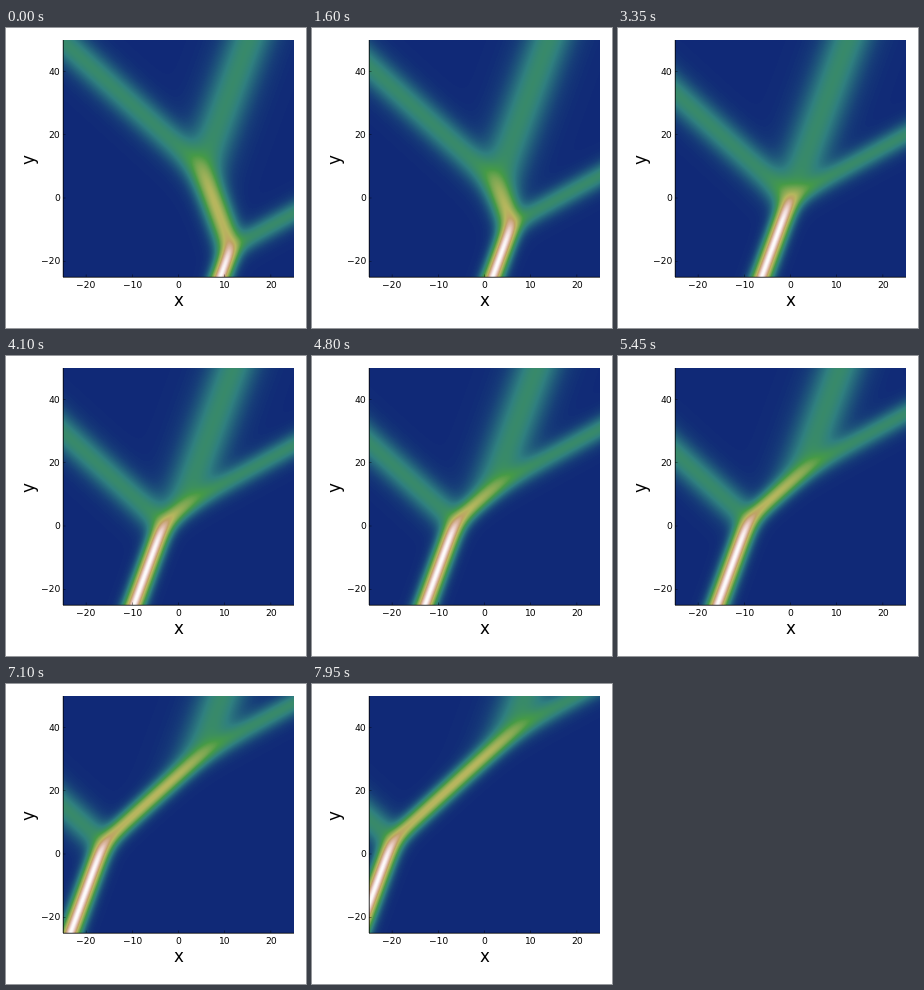
Animation of 300 by 300 pixels, one loop 8 s. Source, as a matplotlib script:

```python
import numpy as np
import matplotlib.pyplot as plt
from matplotlib.animation import FuncAnimation

SIZE, DPI = 300, 100
FRAMES, INTERVAL = 160, 50
LEFT, RIGHT, TOP, BOTTOM = 57, 288, 12, 249
XMIN, XMAX, YMIN, YMAX = -25, 25, -25, 50
K = np.array([-0.625, -0.125, 0.375, 0.875])   # wave numbers
T_MEET, DT = 67, 0.375                         # frame where all waves meet
PEAK = (K[-1] - K[0]) ** 2 / 2
GAIN = 7                                       # strength of the log scale
VMAX = np.log1p(GAIN)


def px(x):
    return LEFT + (x - XMIN) / (XMAX - XMIN) * (RIGHT - LEFT)


def py(y):
    return BOTTOM - (y - YMIN) / (YMAX - YMIN) * (BOTTOM - TOP)


def points(pixels):
    return pixels * 72 / DPI


COLS, ROWS = RIGHT - LEFT, BOTTOM - TOP
xs = XMIN + (np.arange(COLS) + 0.5) * (XMAX - XMIN) / COLS
ys = YMAX - (np.arange(ROWS) + 0.5) * (YMAX - YMIN) / ROWS
X, Y = np.meshgrid(xs, ys)
BASE = [k * X - k**2 * Y for k in K]


def wave(frame):
    """Log-scaled 2 (log tau)_xx, where tau is a sum of four exponentials."""
    t = (frame - T_MEET) * DT
    phase = np.array([b + k**3 * t for b, k in zip(BASE, K)])
    w = np.exp(phase - phase.max(axis=0))
    w /= w.sum(axis=0)
    mean = np.tensordot(K, w, 1)
    var = sum(wi * (k - mean) ** 2 for wi, k in zip(w, K))
    return np.log1p(GAIN * 2 * var / PEAK)


plt.rcParams["font.family"] = "DejaVu Sans"
fig = plt.figure(figsize=(SIZE / DPI, SIZE / DPI), dpi=DPI, facecolor="white")
ax = fig.add_axes([0, 0, 1, 1])
image = ax.imshow(wave(0), cmap="gist_earth", vmin=-VMAX / 9, vmax=VMAX,
                  extent=[LEFT, RIGHT, BOTTOM, TOP], aspect="auto",
                  interpolation="nearest")
ax.set_xlim(0, SIZE)
ax.set_ylim(SIZE, 0)
ax.axis("off")


def line(x, y, width):
    ax.plot(x, y, color="black", lw=points(width), solid_capstyle="butt",
            snap=False)


def label(x, y, text, size, **kw):
    ax.text(x, y, text, fontsize=points(size), va="baseline",
            rotation_mode="anchor", **kw)


line([LEFT, RIGHT], [BOTTOM + 0.2] * 2, 0.8)
line([LEFT + 0.2] * 2, [TOP, BOTTOM], 0.8)

for v in (-20, -10, 0, 10, 20):
    line([px(v)] * 2, [BOTTOM, BOTTOM - 2.5], 0.4)
    label(px(v), 260.5, str(v).replace("-", "\u2212"), 9.2, ha="center")

for v in (-20, 0, 20, 40):
    line([LEFT, LEFT + 2.5], [py(v)] * 2, 0.4)
    label(54.2, py(v) + 3.3, str(v).replace("-", "\u2212"), 9.2, ha="right")

label(172.7, 278, "x", 16.8, ha="center")
label(28.3, 130.6, "y", 16.8, ha="center", rotation=90)


def update(frame):
    image.set_data(wave(frame))
    return (image,)


anim = FuncAnimation(fig, update, frames=FRAMES, interval=INTERVAL,
                     repeat=True, repeat_delay=0, blit=False)
plt.show()
```
